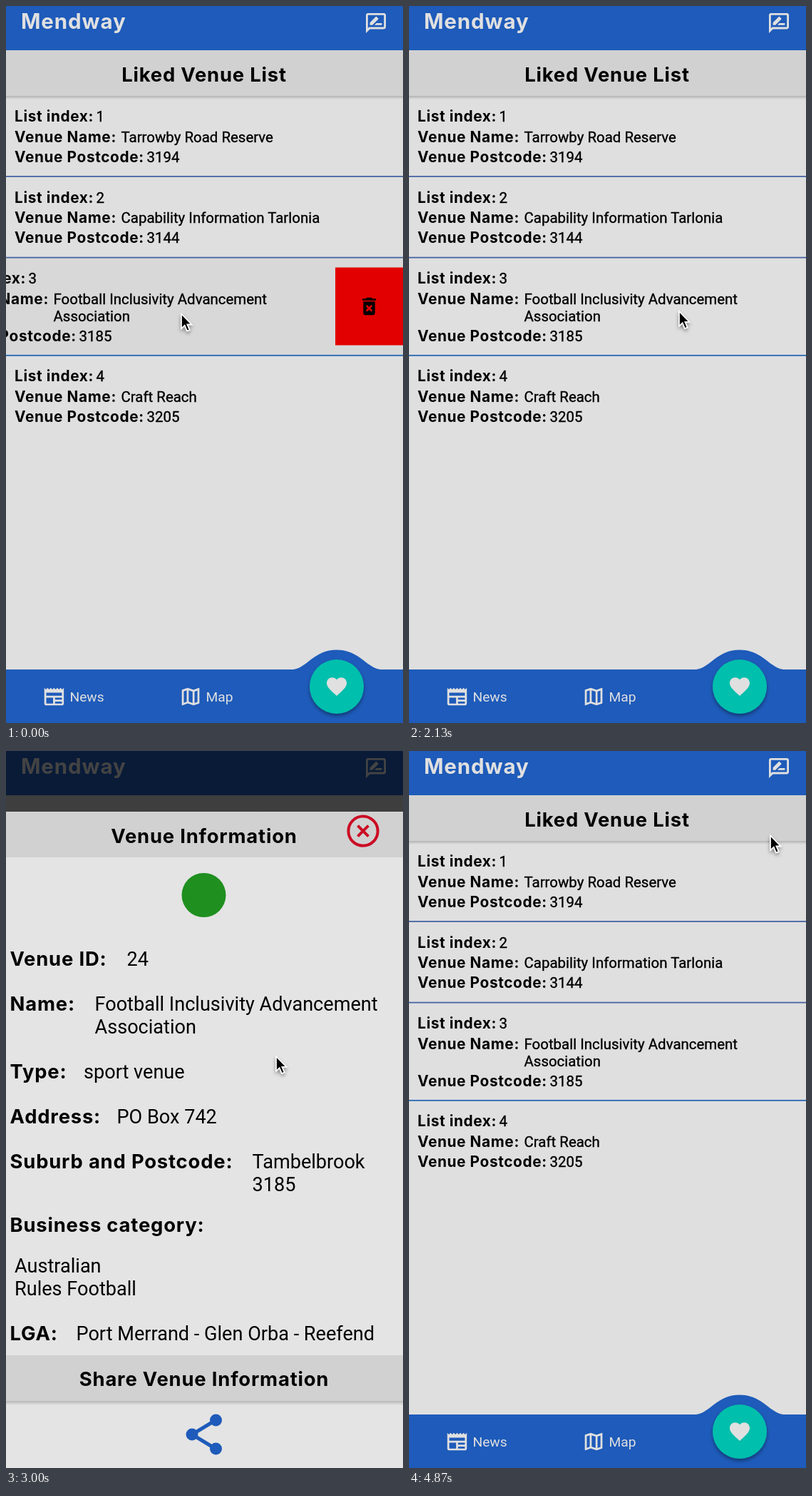
These frames come from a looping animation (557x1005 px, 4940 ms). An HTML page:

```html
<!DOCTYPE html>
<html lang="en">
<head>
<meta charset="utf-8">
<title>Liked Venue List</title>
<style>
  html, body { margin: 0; width: 100%; height: 100%; overflow: hidden; background: #dfdfdf; }
  svg { display: block; width: 100%; height: 100%; }
  text { font-family: Roboto, sans-serif; white-space: pre; }
  .bold { font-family: Inter, sans-serif; font-weight: 700; letter-spacing: .03em; }
  .list { font-size: 20.45px; }
  .list .bold { font-size: 20.8px; }
  .list text:not(.bold) { stroke: #000; stroke-width: .35px; }
  .sheet { font-size: 27.1px; }
  .title, .sheet .bold { font-size: 27.4px; }
  .nav { font-size: 19.2px; fill: #e0e0e0; }
</style>
</head>
<body>
<svg viewBox="0 0 557 1005" preserveAspectRatio="none">
  <defs>
    <linearGradient id="shade" x2="0" y2="1">
      <stop stop-color="#000" stop-opacity=".2"/>
      <stop offset="1" stop-color="#000" stop-opacity="0"/>
    </linearGradient>
    <filter id="drop" x="-50%" y="-50%" width="200%" height="200%">
      <feDropShadow dx="0" dy="3" stdDeviation="2.5" flood-opacity=".4"/>
    </filter>
  </defs>

  <rect width="557" height="1005" fill="#dfdfdf"/>
  <g id="list" class="list"></g>

  <rect y="126" width="557" height="5" fill="url(#shade)"/>
  <rect y="62" width="557" height="64" fill="#d1d1d1"/>
  <rect width="557" height="62" fill="#1e5bba"/>
  <text class="bold" x="21" y="32" font-size="29.5" fill="#e0e0e0">Mendway</text>
  <text class="bold title" x="278" y="105.5" text-anchor="middle">Liked Venue List</text>
  <g transform="translate(502.2 7.2) scale(1.4)" fill="#e0e0e0">
    <path d="M20 2H4c-1.1 0-2 .9-2 2v18l4-4h14c1.1 0 2-.9 2-2V4c0-1.1-.9-2-2-2zm0 14H5.2L4 17.2V4h16z"/>
    <path d="M18 14v-2h-5.5l-2 2zM6 14h2.5l5.9-5.9c.2-.2.2-.5 0-.7l-1.8-1.8c-.2-.2-.5-.2-.7 0L6 11.5z"/>
  </g>

  <g class="nav">
    <path fill="#1e5bba" d="M0 930H403C422 928 432 902.5 464 902.5S506 928 525 930H557V1005H0Z"/>
    <path transform="translate(51 951.6) scale(1.37)" d="M22 3l-1.67 1.67L18.67 3 17 4.67 15.33 3l-1.66 1.67L12 3l-1.67 1.67L8.67 3 7 4.67 5.33 3 3.67 4.67 2 3v16c0 1.1.9 2 2 2h16c1.1 0 2-.9 2-2zM11 19H4v-6h7zm9 0h-7v-2h7zm0-4h-7v-2h7zm0-4H4V8h16z"/>
    <text x="89.5" y="975">News</text>
    <path transform="translate(242.6 951.6) scale(1.37)" d="M20.5 3L15 5.1 9 3 3.4 4.9Q3 5 3 5.4V20.5q0 .5.7.5L9 18.9l6 2.1 5.6-1.9q.4-.1.4-.5V3.5q0-.5-.5-.5zM10 5.5l4 1.4v11.6l-4-1.4zm-5 1l3-1v11.7l-3 1.1zm14 11l-3 1V6.9l3-1.2z"/>
    <text x="280.5" y="975">Map</text>
    <circle cx="464" cy="954" r="38" fill="#00bfac" filter="url(#drop)"/>
    <path transform="translate(447.2 937) scale(1.4)" d="M12 21.35l-1.45-1.32C5.4 15.36 2 12.28 2 8.5 2 5.42 4.42 3 7.5 3c1.74 0 3.41.81 4.5 2.09C13.09 3.81 14.76 3 16.5 3 19.58 3 22 5.42 22 8.5c0 3.78-3.4 6.86-8.55 11.54z"/>
  </g>

  <rect id="backdrop" width="557" height="1005"/>

  <g id="sheet" class="sheet">
    <rect width="557" height="1005" fill="#e4e4e4"/>
    <rect width="557" height="64" fill="#d1d1d1"/>
    <text class="bold" x="278" y="43.5" text-anchor="middle">Venue Information</text>
    <g fill="none" stroke="#cb0c24" stroke-width="4">
      <circle cx="501" cy="27.2" r="20.6"/>
      <path d="M493.500 19.700l15 15m0-15l-15 15"/>
    </g>
    <circle cx="277.5" cy="117" r="31" fill="#1f8f1f"/>
    <g id="details"></g>
    <rect y="826" width="557" height="6" fill="url(#shade)"/>
    <rect y="762" width="557" height="64" fill="#d1d1d1"/>
    <text class="bold" x="278" y="805" text-anchor="middle">Share Venue Information</text>
    <g fill="#1e5bba">
      <path d="M294 853L261 873L294 893" fill="none" stroke="#1e5bba" stroke-width="5"/>
      <circle cx="294.5" cy="853" r="8.5"/>
      <circle cx="261" cy="873" r="8.5"/>
      <circle cx="294.5" cy="893" r="8.5"/>
    </g>
  </g>

  <path id="cursor" d="M1 1.500V22L5.700 17.600L9 25.500L12.600 24L9.300 16.300H15.500Z" stroke="#fff" stroke-width="1.7" filter="url(#drop)"/>
</svg>

<script>
const LOOP = 4940, OPEN_Y = 85, HEIGHT = 1005, SLIDE = 300;
const $ = id => document.getElementById(id);
const text = (x, y, content, cls = '') => `<text class="${cls}" x="${x}" y="${y}">${content}</text>`;

const venues = [
  { top: 126, lines: ['Tarrowby Road Reserve'], postcode: 3194 },
  { top: 239.7, lines: ['Capability Information Tarlonia'], postcode: 3144 },
  { top: 353.4, lines: ['Football Inclusivity Advancement', 'Association'], postcode: 3185 },
  { top: 490.3, lines: ['Craft Reach'], postcode: 3205 },
];

const venueRow = ({ top, lines, postcode }, i) => {
  const last = top + 64.5 + 24 * (lines.length - 1);
  return text(12, top + 36, 'List index:', 'bold') + text(126.5, top + 36, i + 1) +
    text(12, top + 64.5, 'Venue Name:', 'bold') +
    lines.map((line, n) => text(161.5, top + 64.5 + 24 * n, line)).join('') +
    text(12, last + 28, 'Venue Postcode:', 'bold') + text(197.5, last + 28, postcode);
};

const deleteButton = `<rect x="557" y="366.5" width="95" height="109" fill="#e30000"/>
  <path transform="translate(588.2 404.7) scale(1.36)" d="M6 19c0 1.1.9 2 2 2h8c1.1 0 2-.9 2-2V7H6zm2.46-7.12l1.41-1.41L12 12.59l2.12-2.12 1.41 1.41L13.41 14l2.12 2.12-1.41 1.41L12 15.41l-2.12 2.12-1.41-1.41L10.59 14zM15.5 4l-1-1h-5l-1 1H5v2h14V4z" fill-rule="evenodd"/>`;

$('list').innerHTML =
  '<rect id="pressed" y="353" width="557" height="137" fill="#d8d8d8"/>' +
  venues.map((venue, i) => i === 2
    ? `<g id="swipeRow">${venueRow(venue, i)}${deleteButton}</g>`
    : venueRow(venue, i)).join('') +
  [[238, '#4664a2'], [351.7, '#4664a2'], [488.9, '#2467b3']]
    .map(([y, color]) => `<rect y="${y}" width="557" height="1.8" fill="${color}"/>`).join('');

// Label, label baseline, value x, value lines, optional value baseline
const details = [
  ['Venue ID:', 215.5, 169.5, ['24']],
  ['Name:', 278.8, 124.5, ['Football Inclusivity Advancement', 'Association']],
  ['Type:', 373.8, 109, ['sport venue']],
  ['Address:', 437, 155.5, ['PO Box 742']],
  ['Suburb and Postcode:', 500, 345.5, ['Tambelbrook', '3185']],
  ['Business category:', 589, 12, ['Australian', 'Rules Football'], 645.7],
  ['LGA:', 741, 98.5, ['Port Merrand - Glen Orba - Reefend']],
];
$('details').innerHTML = details.map(([label, y, x, lines, valueY = y]) =>
  text(5.5, y, label, 'bold') + lines.map((line, n) => text(x, valueY + 31.8 * n, line)).join('')).join('');

const clamp = (v, lo = 0, hi = 1) => Math.min(hi, Math.max(lo, v));

// cubic-bezier(.25, .1, .25, 1)
function ease(p) {
  const bezier = (a, b, s) => 3 * a * s * (1 - s) ** 2 + 3 * b * s * s * (1 - s) + s ** 3;
  let lo = 0, hi = 1;
  for (let i = 0; i < 20; i++) {
    const mid = (lo + hi) / 2;
    if (bezier(.25, .25, mid) < p) lo = mid; else hi = mid;
  }
  return bezier(.1, 1, lo);
}

// Time, x, y
const pointer = [
  [0, 245, 430], [500, 245, 430], [900, 378, 434.5], [1500, 378, 434.5],
  [1800, 378, 426.5], [3050, 378, 426.5], [3600, 490, 126],
  [3700, 490, 126], [4100, 506, 117], [LOOP, 506, 117],
];

function pointerAt(t) {
  const i = pointer.findIndex(key => key[0] > t);
  const [t0, x0, y0] = pointer[i - 1], [t1, x1, y1] = pointer[i];
  const p = ease((t - t0) / (t1 - t0));
  return [x0 + (x1 - x0) * p, y0 + (y1 - y0) * p];
}

// The closing slide first becomes visible when already under way.
function sheetProgress(t) {
  const slide = start => ease(clamp((t - start) / SLIDE));
  return t < 4330 ? slide(2627.5) : 1 - slide(4234);
}

const move = (id, x, y) => $(id).setAttribute('transform', `translate(${x} ${y})`);

function draw(now) {
  const t = now % LOOP;
  const [x, y] = pointerAt(t);
  const swipe = t < 1000 ? clamp(x - 340, -95, 0) : 0;
  const tapped = t >= 2530 && t < 2700;
  const shown = sheetProgress(t);
  move('cursor', x, y);
  move('swipeRow', swipe, 0);
  $('pressed').setAttribute('opacity', tapped ? 1 : -swipe / 95);
  $('backdrop').setAttribute('opacity', .7 * shown);
  move('sheet', 0, HEIGHT - (HEIGHT - OPEN_Y) * shown);
  requestAnimationFrame(draw);
}
draw(performance.now());
</script>
</body>
</html>
```
